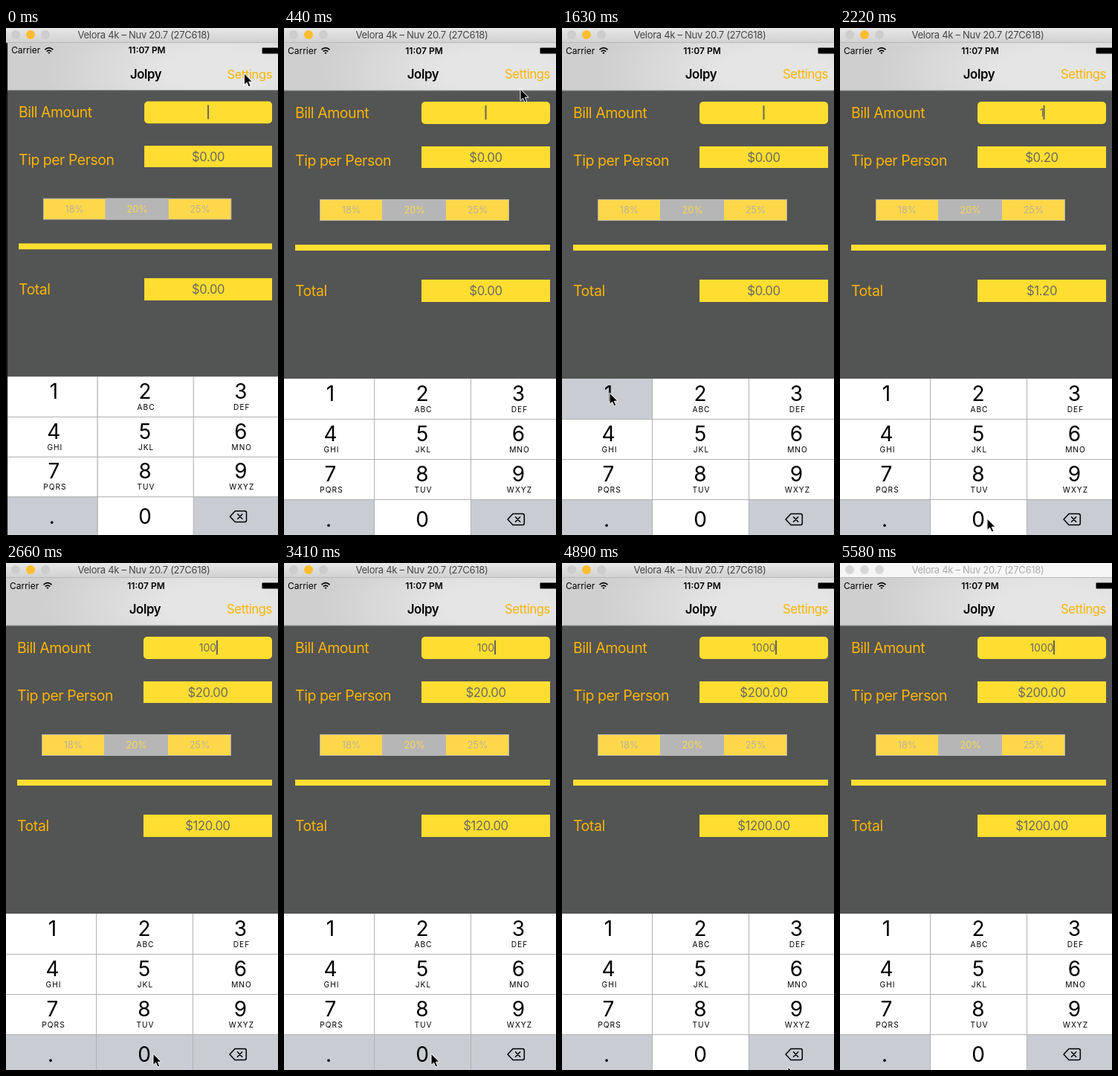
Write an HTML page that moves like this. It is 366 px wide and 681 px high and loops after 5.68 s.

```html
<!DOCTYPE html>
<html lang="en">
<head>
<meta charset="utf-8">
<title>Tip calculator</title>
<style>
  html, body { margin: 0; width: 100%; height: 100%; overflow: hidden; background: #111; }
  svg { display: block; width: 100%; height: 100%; }
  text { font-family: Inter, "Liberation Sans", sans-serif; letter-spacing: -.023em; }
  .mid { text-anchor: middle; }
  .label { font-size: 19.5px; fill: #fbb503; }
  .link { font-size: 16.6px; fill: #fbb503; text-anchor: end; }
  .heading { font-size: 16.8px; font-weight: 600; }
  .status { font-size: 12px; letter-spacing: 0; }
  .value { font-size: 16.7px; fill: #6b6a60; }
  .entry { font-size: 14px; fill: #6b6a60; letter-spacing: 0; }
  .segment { font-size: 12.7px; fill: #b7b29e; letter-spacing: 0; }
  .digit { font-size: 28px; letter-spacing: 0; }
  .letters { font-size: 10.2px; letter-spacing: 1px; }
  .gold { fill: #ffde31; }
  .bar-title { font-size: 13px; fill: #454545; }
  .light { fill: #cdcdcd; }
  .light.lit { fill: #fdbd2f; }
  .inactive .bar { fill: #f6f6f6; }
  .inactive .bar-title { fill: #acacac; }
  .inactive .light { fill: #d6d6d6; }
</style>
</head>
<body>
<svg viewBox="0 0 366 681" preserveAspectRatio="none">
  <defs>
    <linearGradient id="chrome" x2="0" y2="1">
      <stop stop-color="#e7e7e7"/><stop offset="1" stop-color="#d1d1d1"/>
    </linearGradient>
    <radialGradient id="navFill" gradientUnits="userSpaceOnUse" cx="0" cy="0" r="1"
        gradientTransform="translate(285 58) scale(235 95)">
      <stop offset=".3" stop-color="#e5e5e5"/>
      <stop offset=".65" stop-color="#dadada"/>
      <stop offset="1" stop-color="#cfcfcf"/>
    </radialGradient>
  </defs>

  <g id="screen">
    <rect y="19" width="366" height="680" fill="#535454"/>
    <rect y="19" width="366" height="65" fill="url(#navFill)"/>
    <rect y="83.5" width="366" height="1" fill="#969696"/>

    <text class="status" x="5" y="34.5">Carrier</text>
    <g fill="none" stroke="#000" stroke-width="1.7">
      <path d="M50.5 29.2Q56 24 61.5 29.2M52.8 31.6Q56 28.6 59.2 31.6"/>
      <path d="M54.4 33.2Q56 31.8 57.6 33.2L56 34.9Z" fill="#000" stroke="none"/>
    </g>
    <text class="status mid" x="188.5" y="34.5" font-weight="600">11:07 PM</text>
    <rect x="344.5" y="26.5" width="22" height="8" rx="1"/>

    <text class="heading mid" x="187" y="68">Jolpy</text>
    <text class="link" x="358" y="68">Settings</text>

    <text class="label" x="15" y="120.6">Bill Amount</text>
    <text class="label" x="15" y="184.6">Tip per Person</text>
    <text class="label" x="15" y="360">Total</text>

    <rect class="gold" x="185" y="99" width="173" height="30" rx="5"/>
    <rect class="gold" x="185" y="159" width="173" height="29"/>
    <rect class="gold" x="15" y="291" width="343" height="8"/>
    <rect class="gold" x="185" y="338" width="173" height="30"/>
    <text class="entry mid" id="bill" x="271.5" y="118.6"></text>
    <rect id="caret" y="104" width="2" height="19" fill="#66645c"/>
    <text class="value mid" id="tip" x="271.5" y="179.6"></text>
    <text class="value mid" id="total" x="271.5" y="359.2"></text>

    <rect x="48.5" y="230.5" width="254" height="28" fill="#ffd84a" stroke="#b5b3aa"/>
    <rect x="132" y="230" width="86" height="29" fill="#b6b6b6"/>
    <text class="segment mid" x="90.5" y="249">18%</text>
    <text class="segment mid" x="175.5" y="249" style="fill:#ffd84a">20%</text>
    <text class="segment mid" x="260.5" y="249">25%</text>

    <g id="keys"></g>
    <g fill="none" stroke="#000" stroke-width="1.5" stroke-linejoin="round" stroke-linecap="round">
      <path d="M308 652.5H321Q323.300 652.500 323.300 655V665Q323.300 667.500 321 667.500H308L301 660Z"/>
      <path d="M311.500 656.800L317.700 663.200M317.700 656.800L311.500 663.200"/>
    </g>
  </g>

  <g id="window">
    <rect class="bar" width="366" height="19.500" fill="url(#chrome)"/>
    <rect y="19" width="366" height="1" fill="#b9b9b9"/>
    <circle class="light" cx="13" cy="9" r="6"/>
    <circle class="light lit" cx="33" cy="9" r="6"/>
    <circle class="light" cx="53" cy="9" r="6"/>
    <text class="bar-title mid" x="185.500" y="14">Velora 4k – Nuv 20.7 (27C618)</text>
  </g>

  <path id="pointer" d="M0 0V15.500L3.600 12.200L6 17.800L8.700 16.600L6.300 11.200H11Z"
    stroke="#fff" stroke-width="1" stroke-linejoin="round"/>
</svg>
<script>
  const $ = id => document.getElementById(id);
  const LOOP = 5680;
  const KEY_GREY = '#c9ccd3';
  const columns = [0, 122, 252, 367];
  const rows = [471, 525.5, 579.5, 633.5, 700];
  const letters = ['', 'ABC', 'DEF', 'GHI', 'JKL', 'MNO', 'PQRS', 'TUV', 'WXYZ'];
  const keyRects = {};

  function add(tag, attrs, content = '') {
    const node = document.createElementNS('http://www.w3.org/2000/svg', tag);
    for (const name in attrs) node.setAttribute(name, attrs[name]);
    node.textContent = content;
    return $('keys').appendChild(node);
  }

  [...'123456789.0<'].forEach((name, i) => {
    const col = i % 3, row = Math.floor(i / 3);
    const x = columns[col], y = rows[row];
    const center = [62.5, 186, 315.5][col];
    const idle = name === '.' || name === '<' ? KEY_GREY : '#fff';
    keyRects[name] = add('rect', {
      x, y, width: columns[col + 1] - x, height: rows[row + 1] - y, fill: idle
    });
    if (name !== '<') {
      add('text', {
        class: 'digit mid', x: name === '.' ? 60 : center, y: row < 3 ? 501 + 54 * row : 670
      }, name);
    }
    if (letters[i]) add('text', { class: 'letters mid', x: center + 1.5, y: 516 + 54 * row }, letters[i]);
  });
  for (const x of columns.slice(1, 3)) add('rect', { x: x - 1, y: 471, width: 1, height: 230, fill: '#b2b2b2' });
  for (const y of rows.slice(1, 4)) add('rect', { x: 0, y: y - .5, width: 366, height: 1, fill: '#b2b2b2' });

  // Each step changes only the listed properties.
  const steps = [
    [0, { bill: '', caret: true, pressed: '', at: [320.5, 61], small: true, inactive: false }],
    [150, { small: false }],
    [298, { at: [318, 82] }],
    [446, { at: [308, 165] }],
    [594, { at: [288, 300], caret: false }],
    [742, { at: [262, 418] }],
    [890, { at: [185, 476] }],
    [1190, { at: [178, 474], caret: true }],
    [1337, { at: [118, 479] }],
    [1484, { at: [70, 488] }],
    [1631, { at: [64, 490], pressed: '1' }],
    [1778, { bill: '1', pressed: '' }],
    [1925, { at: [92, 541] }],
    [2072, { at: [165, 630] }],
    [2220, { at: [198, 659] }],
    [2370, { pressed: '0' }],
    [2515, { bill: '10', pressed: '' }],
    [2660, { bill: '100', pressed: '0' }],
    [2810, { pressed: '' }],
    [3260, { caret: false }],
    [3410, { caret: true, pressed: '0' }],
    [3560, { bill: '1000', pressed: '' }],
    [4148, { caret: false, at: [200, 659] }],
    [4296, { at: [222, 661] }],
    [4444, { at: [258, 664] }],
    [4592, { at: [288, 668], caret: true }],
    [4740, { at: [302, 672] }],
    [4888, { at: [304, 677] }],
    [5040, { at: [304, 700] }],
    [5190, { caret: false }],
    [5580, { caret: true, inactive: true }]
  ];
  const caretX = [270.5, 273.5, 279, 283, 287];
  const money = amount => '$' + amount.toFixed(2);

  function draw(time) {
    const state = Object.assign({}, ...steps.filter(([start]) => start <= time).map(step => step[1]));
    const amount = Number(state.bill);
    $('bill').textContent = state.bill;
    $('tip').textContent = money(amount * .2);
    $('total').textContent = money(amount * 1.2);
    $('caret').setAttribute('x', caretX[state.bill.length]);
    $('caret').setAttribute('opacity', state.caret ? 1 : 0);
    for (const name of '10') keyRects[name].setAttribute('fill', state.pressed === name ? KEY_GREY : '#fff');
    $('screen').setAttribute('transform', state.small ? 'translate(2.2 .1) scale(.994)' : '');
    $('window').setAttribute('class', state.inactive ? 'inactive' : '');
    $('pointer').setAttribute('transform', `translate(${state.at})`);
  }

  let shown = -1;
  function tick() {
    const time = performance.now() % LOOP;
    const index = steps.filter(([start]) => start <= time).length;
    if (index !== shown) draw(time);
    shown = index;
    requestAnimationFrame(tick);
  }
  tick();
</script>
</body>
</html>
```
